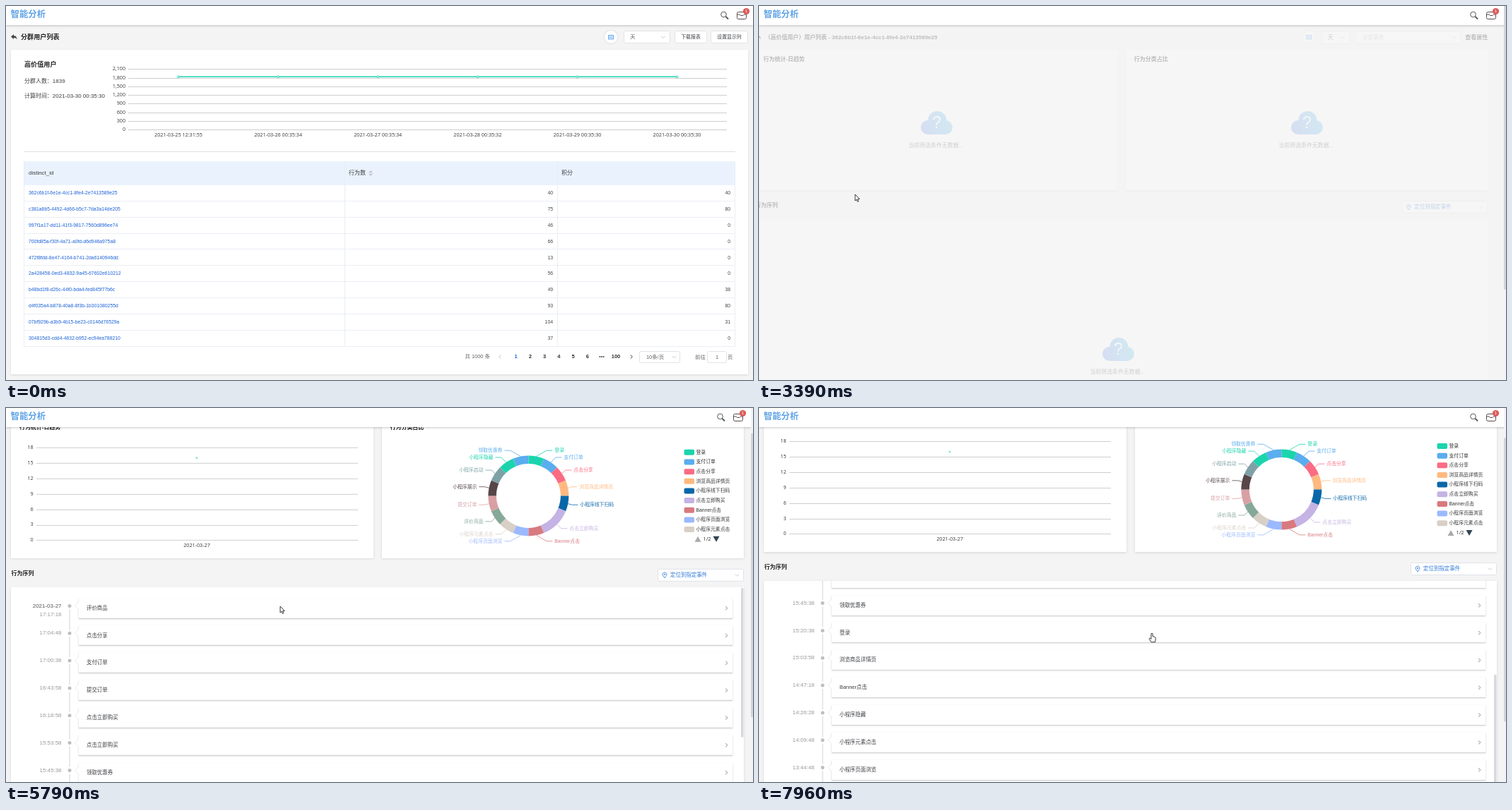
Animation, 1057 px wide and 530 px high, one loop 7990 ms. Source, as an HTML page with a canvas:

```html
<!DOCTYPE html>
<html lang="zh-CN">
<head>
<meta charset="utf-8">
<style>
html, body { margin: 0; width: 100%; height: 100%; overflow: hidden; background: #f4f4f4; }
canvas { position: absolute; left: 0; top: 0; width: 1057px; height: 530px; }
</style>
</head>
<body>
<canvas id="page"></canvas>
<canvas id="overlay"></canvas>
<script>
const W = 1057, H = 530, LOOP = 7990;
const LEAVE = 2620, ENTER = 3300, DATA = 3950, FADE = 500, SLIDE = 17;
const dpr = window.devicePixelRatio || 1;
const [page, overlay] = ['page', 'overlay'].map(id => {
  const canvas = document.getElementById(id);
  canvas.width = W * dpr;
  canvas.height = H * dpr;
  return canvas.getContext('2d');
});
let c = page; // context the helpers draw on

const SANS = '"Liberation Sans","Noto Sans CJK SC","Noto Sans CJK",sans-serif';
const CHART = '"Noto Sans","Noto Sans CJK SC",sans-serif';
const DARK = '#3a3c40', BLUE = '#1c62d6', BORDER = '#e0e3e8', GREEN = '#1bd4ad';

const rows = [
  ['362c6b1f-6e1e-4cc1-8fe4-2e7413589e25', 40, 40],
  ['c381a8b5-4492-4d66-b5c7-7da3a14de205', 75, 80],
  ['997f1a17-dd11-41f3-9817-7560d896ee74', 46, 0],
  ['700fd85a-f30f-4a71-a0fd-d6d946a975a8', 66, 0],
  ['472f8fdd-8e47-4164-b741-2da6140946dd', 13, 0],
  ['2a428458-0ed3-4832-9a45-67602e610212', 56, 0],
  ['b48bd1f8-d26c-44f0-bda4-fed845f77b6c', 49, 38],
  ['d4f035a4-b878-40a8-8f3b-1b301080255d', 93, 80],
  ['07bf929b-a3b9-4b15-be23-c0146d76529a', 104, 31],
  ['304815d3-cdd4-4632-b952-ec94ea788210', 37, 0]
];
const days = ['25 12:31:55', '26 00:35:34', '27 00:35:34', '28 00:35:32', '29 00:35:30', '30 00:35:30'];
// name, colour, label distance from the centre, share
const slices = [
  ['登录', GREEN, 37, 1], ['支付订单', '#5aadee', 50, 1], ['点击分享', '#fa6c84', 64, 1],
  ['浏览商品详情页', '#ffb980', 72, 1], ['小程序线下扫码', '#0867a8', 73, 1],
  ['点击立即购买', '#c4b3e4', 58, 2], ['Banner点击', '#d87a80', 37, 1],
  ['小程序页面浏览', '#9bb9ff', 37, 1], ['小程序元素点击', '#d8d0c7', 50, 1],
  ['评价商品', '#86a899', 64, 1], ['提交订单', '#d8a0a4', 73, 1], ['小程序展示', '#574648', 73, 1],
  ['小程序启动', '#7fa1a6', 64, 1], ['小程序隐藏', GREEN, 50, 1], ['领取优惠券', '#5aadee', 37, 1]
];
const events = [
  ['17:17:18', '评价商品'], ['17:04:48', '点击分享'], ['17:00:38', '支付订单'], ['16:43:58', '提交订单'],
  ['16:18:58', '点击立即购买'], ['15:53:58', '点击立即购买'], ['15:45:38', '领取优惠券'], ['15:20:38', '登录'],
  ['15:03:58', '浏览商品详情页'], ['14:47:18', 'Banner点击'], ['14:26:28', '小程序隐藏'],
  ['14:09:48', '小程序元素点击'], ['13:44:48', '小程序页面浏览'], ['13:28:08', '小程序展示']
];

// time, then values
const pointerKeys = [
  [440, 300, 530], [700, 215, 440], [1000, 160, 330], [1220, 141, 281], [1580, 131, 262],
  [1909, 131, 262], [1910, 133, 260], [2539, 133, 260], [2540, 136, 267], [3880, 136, 267],
  [4070, 190, 269], [4500, 250, 271], [4860, 277, 271], [4900, 278, 271], [5080, 340, 277],
  [5270, 388, 281], [7600, 388, 281], [7780, 475, 300], [7960, 556, 319]
];
const pageKeys = [[5670, 0], [5700, 10], [5790, 48], [5850, 57]];
const listKeys = [
  [6150, 0], [6180, 7], [6270, 42], [6370, 57], [6520, 57], [6550, 64], [6630, 99], [6720, 114],
  [6920, 114], [6950, 119], [7010, 139], [7110, 166], [7200, 180], [7320, 212], [7460, 228]
];

const clamp = v => Math.max(0, Math.min(1, v));

function track(keys, t) {
  const next = keys.findIndex(k => k[0] > t);
  if (next === 0) return keys[0].slice(1);
  if (next < 0) return keys[keys.length - 1].slice(1);
  const a = keys[next - 1], b = keys[next], u = (t - a[0]) / (b[0] - a[0]);
  return a.slice(1).map((v, i) => v + (b[i + 1] - v) * u);
}

// cubic-bezier(.25, .1, .25, 1)
function ease(x) {
  x = clamp(x);
  const curve = (p, q, s) => 3 * p * s * (1 - s) ** 2 + 3 * q * s * s * (1 - s) + s ** 3;
  let lo = 0, hi = 1;
  for (let i = 0; i < 20; i++) {
    const mid = (lo + hi) / 2;
    if (curve(.25, .25, mid) < x) lo = mid; else hi = mid;
  }
  return curve(.1, 1, lo);
}

function text(s, x, y, size, color = DARK, align = 'left', bold = false, family = SANS) {
  c.font = `${bold ? 'bold ' : ''}${size}px ${family}`;
  c.textAlign = align;
  c.textBaseline = 'middle';
  c.fillStyle = color;
  c.fillText(s, x, y);
}
function rect(x, y, w, h, color) {
  c.fillStyle = color;
  c.fillRect(x, y, w, h);
}
function path(points, color, width = 1) {
  c.beginPath();
  points.forEach(p => c.lineTo(...p));
  c.strokeStyle = color;
  c.lineWidth = width;
  c.stroke();
}
function shape(points, color) {
  c.beginPath();
  points.forEach(p => c.lineTo(...p));
  c.fillStyle = color;
  c.fill();
}
function dot(x, y, r, color) {
  c.beginPath();
  c.arc(x, y, r, 0, 7);
  c.fillStyle = color;
  c.fill();
}
function pill(x, y, w, h, r, color) {
  c.beginPath();
  c.roundRect(x, y, w, h, r);
  c.fillStyle = color;
  c.fill();
}
function box(x, y, w, h) {
  pill(x + .5, y + .5, w - 1, h - 1, 2, '#fff');
  c.strokeStyle = BORDER;
  c.lineWidth = 1;
  c.stroke();
}
function shadowed(draw, blur, dy, alpha) {
  c.save();
  c.shadowColor = `rgba(0,0,0,${alpha})`;
  c.shadowBlur = blur * dpr;
  c.shadowOffsetY = dy * dpr;
  draw();
  c.restore();
}
const card = (x, y, w, h) => shadowed(() => rect(x, y, w, h, '#fff'), 3, 1, .12);
const down = (x, y) => path([[x - 2.8, y - 1.4], [x, y + 1.4], [x + 2.8, y - 1.4]], '#b8bcc4', .8);
const side = (x, y, d, color) => path([[x - d, y - 2.6], [x + d, y], [x - d, y + 2.6]], color, .9);

function header(dx) {
  shadowed(() => rect(0, 0, W, 27, '#fff'), 3, 1, .22);
  text('智能分析', 6.5, 13, 12.4, '#5fa3e6', 'left', true);
  c.save();
  c.translate(dx, 0);
  c.beginPath();
  c.arc(1015.5, 12, 3.8, 0, 7);
  c.strokeStyle = '#555';
  c.lineWidth = 1;
  c.stroke();
  path([[1018.5, 15], [1022, 18.5]], '#555', 1.8);
  c.beginPath();
  c.roundRect(1034.5, 8.5, 13, 10, 2);
  c.strokeStyle = '#5a4a4a';
  c.lineWidth = 1;
  c.stroke();
  path([[1034.5, 12], [1038, 12], [1039.5, 13.5], [1043, 13.5], [1044.5, 12], [1047.5, 12]], '#5a4a4a');
  dot(1047.5, 7.5, 4.6, '#dc5b5b');
  text('1', 1047.5, 7.7, 6, '#fff', 'center');
  c.restore();
}

function backArrow() {
  shape([[7, 43.5], [11, 40], [11, 42.2], [14, 42.8], [15.8, 47.5], [13.5, 45.2], [11, 45], [11, 47]], '#444');
}
function viewButton(x) {
  shadowed(() => dot(x, 44, 9, '#fff'), 3, 0, .15);
  rect(x - 4, 41, 8, 6.4, '#6aa9ee');
  rect(x - 3, 42, 6, 4.4, '#d4e6fb');
  rect(x - 2, 43.7, 4, .8, '#6aa9ee');
}
function gridLines(x0, x1, labelX, top, step, values) {
  values.forEach((v, i) => {
    const y = top + step * i;
    rect(x0, Math.round(y), x1 - x0, 1, '#cecece');
    text(v, labelX, y, 7.2, '#444', 'right', false, CHART);
  });
}

function listPage(hoverY) {
  backArrow();
  text('分群用户列表', 21, 44, 9.1, '#222', 'left', true);
  viewButton(856);
  box(874, 35, 66, 18);
  text('天', 883, 44, 7.4, '#606266');
  down(930, 44);
  box(946, 35, 46, 18);
  text('下载报表', 969, 44, 6.9, DARK, 'center');
  box(997, 35, 53, 18);
  text('设置显示列', 1023.5, 44, 6.9, DARK, 'center');

  card(7, 62, 1043, 460);
  text('高价值用户', 26, 83, 9.1, '#222', 'left', true);
  text('分群人数：1839', 26, 107, 7.98);
  text('计算时间：2021-03-30 00:35:30', 26, 128, 7.98);

  gridLines(173, 1020, 169, 89.4, 12.22, ['2,100', '1,800', '1,500', '1,200', '900', '600', '300', '0']);
  const dayX = i => 244 + 141.1 * i;
  path(days.map((d, i) => [dayX(i), 100.2]), GREEN, 1.5);
  days.forEach((d, i) => {
    dot(dayX(i), 100.2, 1.8, GREEN);
    dot(dayX(i), 100.2, .9, '#fff');
    text('2021-03-' + d, dayX(i), 182.5, 7.2, '#444', 'center', false, CHART);
  });
  rect(26, 206, 1006, 1, '#dcdee0');

  const rowH = 22.85, top = 254;
  rect(26, 220, 1005, 34, '#eaf3fd');
  text('distinct_id', 32, 237, 7.98);
  text('行为数', 485, 237, 7.98);
  shape([[513, 236.2], [516, 233], [519, 236.2]], '#c0c4cc');
  shape([[513, 237.8], [516, 241], [519, 237.8]], '#c0c4cc');
  text('积分', 786, 237, 7.98);
  rows.forEach(([id, actions, points], i) => {
    const y = top + rowH * i, mid = y + 11.3;
    if (hoverY >= y && hoverY < y + rowH) rect(26, y, 1005, rowH, '#f5f7fa');
    rect(26, Math.round(y + rowH) - 1, 1005, 1, '#ebeef5');
    text(id, 32, mid, 6.84, BLUE);
    text(actions, 774, mid, 6.84, '#444', 'right');
    text(points, 1025, mid, 6.84, '#444', 'right');
  });
  for (const x of [25, 479, 780, 1031]) rect(x, 220, 1, 263, '#e8edf4');

  text('共 1000 条', 649.5, 497, 7.4, '#606266');
  side(699, 497, -1.4, '#b8bcc4');
  [1, 2, 3, 4, 5, 6].forEach(n => text(n, 701.2 + 20.25 * n, 497, 7.4, n > 1 ? '#303133' : BLUE, 'center', true));
  for (const dx of [-2.6, 0, 2.6]) dot(843 + dx, 497, .9, '#303133');
  text('100', 863, 497, 7.4, '#303133', 'center', true);
  side(885, 497, 1.4, '#303133');
  box(896, 489, 58, 17);
  text('10条/页', 906, 497.5, 7.4, '#606266');
  down(945.5, 497.5);
  text('前往', 975, 497.5, 7.4, '#606266');
  box(992, 489, 28, 17);
  text('1', 1006, 497.5, 7.4, '#606266', 'center');
  text('页', 1021, 497.5, 7.4, '#606266');
}

function emptyState(x, y) {
  const g = c.createLinearGradient(x - 22, y + 12, x + 22, y - 6);
  g.addColorStop(0, '#82a2ee');
  g.addColorStop(1, '#6ecbee');
  c.beginPath();
  c.roundRect(x - 22.5, y - 3, 45, 20, 10);
  c.moveTo(x + 14, y - 3);
  c.arc(x + 1, y - 3, 13, 0, 7);
  c.fillStyle = g;
  c.fill();
  text('?', x, y + 1.5, 23, '#fff', 'center');
  text('当前筛选条件无数据...', x - 1, y + 33, 7.9, '#666', 'center');
}

function pie(progress) {
  const cx = 739.3, cy = 172.6, start = -Math.PI / 2, unit = Math.PI / 8;
  c.save();
  c.beginPath();
  c.moveTo(cx, cy);
  c.arc(cx, cy, 200, start, start + Math.PI * 2 * progress);
  c.clip();
  let at = 0;
  for (const [name, color, reach, share] of slices) {
    const a0 = start + at * unit, a1 = a0 + share * unit, mid = (a0 + a1) / 2;
    at += share;
    c.beginPath();
    c.arc(cx, cy, 57, a0, a1);
    c.arc(cx, cy, 45.5, a1, a0, true);
    c.fillStyle = color;
    c.fill();
    const dir = Math.cos(mid) > 0 ? 1 : -1, y = cy + 65.5 * Math.sin(mid);
    path([[cx + 57 * Math.cos(mid), cy + 57 * Math.sin(mid)],
      [cx + dir * (reach - 11.5), y], [cx + dir * (reach - 3), y]], color, .8);
    text(name, cx + dir * reach, y, 6.84, color, dir > 0 ? 'left' : 'right');
  }
  c.restore();
}

function charts(t) {
  gridLines(43, 498, 38.5, 104, 21.9, [18, 15, 12, 9, 6, 3, 0]);
  text('2021-03-27', 270, 243, 7.2, '#444', 'center', false, CHART);
  dot(270, 119, 1.6 * clamp((t - DATA) / 800), '#8fe6d0');

  pie(1 - (1 - clamp((t - DATA) / 1000)) ** 3);
  slices.slice(0, 9).forEach(([name, color], i) => {
    const y = 111 + 13.65 * i;
    pill(959.5, y - 4, 14.5, 8, 2, color);
    text(name, 976.5, y, 6.84, '#333');
  });
  shape([[974.5, 238], [979, 230], [983.5, 238]], '#aaa');
  text('1/2', 992, 234, 7.2, '#333', 'center', false, CHART);
  shape([[1000.5, 230], [1009.5, 230], [1005, 238]], '#2f4554');
}

function timeline(scroll) {
  c.save();
  c.beginPath();
  c.rect(7, 302, 1037, 368);
  c.clip();
  rect(89.3, 328 - scroll, 1.5, 620, '#e2e2e2');
  events.forEach(([time, name], i) => {
    const y = 328.6 + 38.83 * i - scroll, snapped = Math.round(y);
    dot(90, y, 5, '#fff');
    dot(90, y, 2.5, '#bfbfbf');
    if (i === 0) text('2021-03-27', 78.5, y, 7.98, '#555', 'right');
    text(time, 78.5, i ? y : y + 12.3, 7.98, '#999', 'right');
    shadowed(() => rect(103, snapped - 11, 925, 28, '#fff'), 2, 1, .2);
    rect(103, snapped + 17, 925, 1, '#d4d4d4');
    shape([[103.5, y - 6], [98, y], [103.5, y + 6]], '#fff');
    path([[103, y - 6], [98, y], [103, y + 6]], '#e8e8e8', .8);
    text(name, 114, y + 3.2, 7.45);
    side(1019.5, y + 3.2, 1.5, '#888');
  });
  c.restore();
  pill(1040, 303 + scroll * .578, 3.5, 212, 1.7, '#d6d8dd');
}

function detailPage(t) {
  backArrow();
  text('（高价值用户）用户列表 - ' + rows[0][0], 21, 44.5, 7.98, '#222', 'left', true);
  viewButton(791);
  box(809, 35, 40, 19);
  text('天', 817.5, 44.5, 7.98, '#606266');
  down(838.5, 44.5);
  box(857, 35, 149, 19);
  text('全部事件', 867, 44.5, 7.45, '#b4b8c0');
  down(996, 44.5);
  text('查看属性', 1012, 44.5, 7.98, '#222', 'left', true);

  card(7, 62, 513, 199);
  card(532, 62, 512, 199);
  text('行为统计-日趋势', 19, 75.5, 7.98, '#222', 'left', true);
  text('行为分类占比', 543.5, 75.5, 7.98, '#222', 'left', true);
  text('行为序列', 7.5, 283, 7.98, '#222', 'left', true);
  box(922, 276, 122, 18);
  c.beginPath();
  c.arc(932, 284, 2.9, 2.6, .54);
  c.lineTo(932, 289);
  c.closePath();
  c.strokeStyle = '#3b82dc';
  c.lineWidth = .9;
  c.stroke();
  dot(932, 284, 1, '#3b82dc');
  text('定位到指定事件', 940, 285, 7.45, '#2f78d6');
  down(1034.5, 285);
  card(7, 302, 1037, 368);

  if (t < DATA) {
    emptyState(264, 165);
    emptyState(788, 165);
    emptyState(521, 486);
  } else {
    charts(t);
    timeline(track(listKeys, t)[0]);
  }
}

const arrowCursor = new Path2D('M0,0V9L2,7.2L3.4,10.3L4.9,9.7L3.5,6.7L6.2,6.5Z');
const handCursor = new Path2D('M-1.1,1Q0,-.8 1.1,1V4.6L4,5.4Q5.5,6 5.3,8L4.4,12.8H-1L-3.8,8.6Q-4,6.8 -2.6,7.2L-1.1,8.4Z');
function pointer(t, [x, y]) {
  const hand = (t >= 1910 && t < 2600) || t >= 5850;
  c.save();
  c.translate(x, y);
  c.fillStyle = '#fff';
  c.strokeStyle = '#222';
  c.lineWidth = .9;
  c.lineJoin = 'round';
  const cursor = hand ? handCursor : arrowCursor;
  c.fill(cursor);
  c.stroke(cursor);
  c.restore();
}

function begin(context, dx = 0, dy = 0) {
  c = context;
  c.setTransform(dpr, 0, 0, dpr, 0, 0);
  c.clearRect(0, 0, W, H);
  c.translate(dx, dy);
}

function draw(t) {
  const tip = track(pointerKeys, t), scroll = track(pageKeys, t)[0];
  const entered = t >= ENTER;
  const u = ease((t - (entered ? ENTER : LEAVE)) / FADE);

  page.canvas.style.opacity = entered ? u : 1 - u;
  begin(page, SLIDE * (entered ? u - 1 : u), -scroll);
  if (entered) detailPage(t);
  else listPage(t >= 440 ? tip[1] : -1);

  begin(overlay);
  header(entered ? -5 : 0);
  if (entered) {
    rect(1054, 0, 3, H, '#f3f3f5');
    rect(1054, scroll * .745, 3, 402, '#d3d5da');
  }
  if (t >= 440) pointer(t, tip);
}

const began = performance.now();
function tick() {
  draw((performance.now() - began) % LOOP);
  requestAnimationFrame(tick);
}
tick();
</script>
</body>
</html>
```
